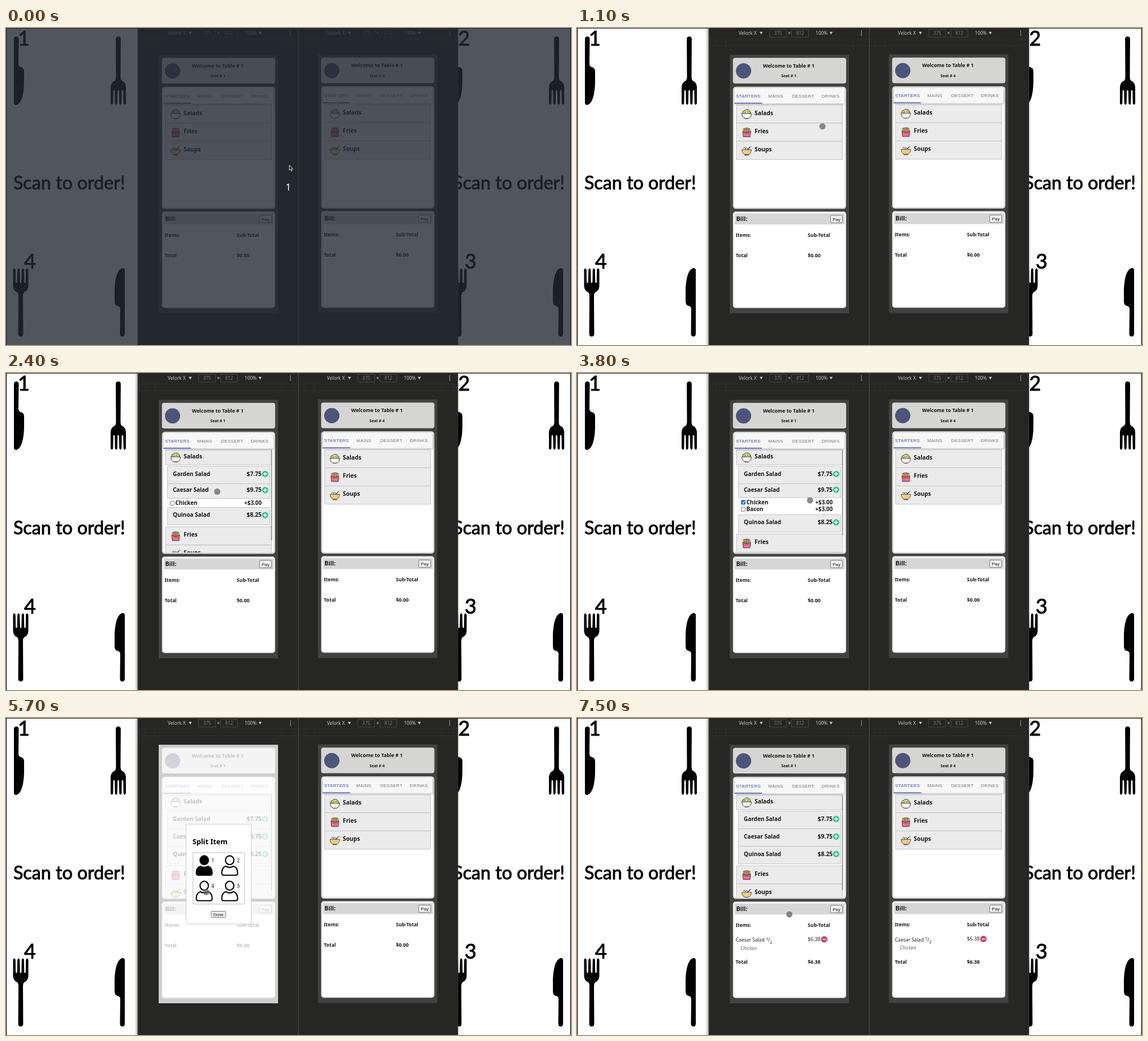
Write an HTML page with a canvas that moves like this. It is 999x560 px and loops after 8 s.

```html
<!DOCTYPE html>
<html lang="en">
<head>
<meta charset="utf-8">
<title>Table ordering demo</title>
<style>
html, body { margin: 0; width: 100%; height: 100%; overflow: hidden; background: #262624; }
canvas { display: block; width: 999px; height: 560px; }
</style>
</head>
<body>
<canvas id="stage" width="999" height="560"></canvas>
<script>
const g = document.getElementById('stage').getContext('2d');
const LOOP = 8000, STEP = 100;
const UI = '"Noto Sans", "Open Sans", sans-serif';
const ARIAL = '"Liberation Sans", Arial, sans-serif';
const ROUND = 'Lato, sans-serif';

// time, x, y of the pointer
const PATH = [
  [0, 501, 242], [300, 501, 242], [400, 496, 244], [700, 488, 236], [800, 488, 236],
  [900, 478, 219], [1000, 455, 195], [1200, 413, 152.5], [1500, 413, 152.5],
  [1800, 393, 174], [1900, 393, 174], [2200, 373.5, 209.5], [2400, 373.5, 209.5],
  [2500, 365, 215], [2600, 365, 215], [3300, 294, 229], [3400, 294, 229],
  [3500, 310, 228.5], [3600, 310, 228.5], [3800, 412, 225], [3900, 412, 225],
  [4400, 458, 206], [4600, 458, 206], [5400, 378, 269], [5700, 354, 307.5],
  [5900, 354, 307.5], [6000, 353, 308.5], [6300, 353, 308.5], [6900, 375.5, 347], [8000, 375.5, 347]
];

const clamp = v => Math.max(0, Math.min(1, v));
const ramp = (t, start, dur) => clamp((t - start) / dur);
const easeOut = p => 1 - (1 - p) * (1 - p);
const mix = (a, b, p) => a + (b - a) * p;

function pointerAt(t) {
  const i = PATH.findIndex(k => k[0] > t);
  const [t0, x0, y0] = PATH[i - 1], [t1, x1, y1] = PATH[i];
  const p = (t - t0) / (t1 - t0);
  return [mix(x0, x1, p), mix(y0, y1, p)];
}

function text(s, x, y, size, { weight = 700, color = '#161616', align = 'left', font = UI, style = '', gap = 0, bold = 0 } = {}) {
  g.font = `${style} ${weight} ${size}px ${font}`;
  g.letterSpacing = gap + 'px';
  g.textAlign = align;
  g.fillStyle = color;
  g.fillText(s, x, y);
  if (bold) {
    g.lineJoin = 'round';
    g.lineWidth = bold;
    g.strokeStyle = color;
    g.strokeText(s, x, y);
  }
}

function box(x, y, w, h, fill, stroke, r = 0, line = 1) {
  g.beginPath();
  g.roundRect(x, y, w, h, r);
  if (fill) { g.fillStyle = fill; g.fill(); }
  if (stroke) { g.strokeStyle = stroke; g.lineWidth = line; g.stroke(); }
}

function disc(x, y, r, fill) {
  g.beginPath();
  g.arc(x, y, r, 0, Math.PI * 2);
  g.fillStyle = fill;
  g.fill();
}

function shape(d, fill, stroke, line = 0.9) {
  const p = new Path2D(d);
  if (fill) { g.fillStyle = fill; g.fill(p); }
  if (stroke) { g.strokeStyle = stroke; g.lineWidth = line; g.stroke(p); }
}

function at(x, y, draw, turn = 0) {
  g.save();
  g.translate(x, y);
  g.rotate(turn);
  draw();
  g.restore();
}

// ---- posters ----
const knife = () =>
  shape('M5 0 C-4 2 -9 18 -9 44 L-9 59 Q-9 66 -3 67 Q1 68 1 73 L0.5 116 Q0.5 121 4.7 121 Q9 121 9 116 L9 4 Q9 0 5 0 Z', '#000');

function fork() {
  shape('M-13.5 3 Q-11.3 -2 -9.2 3 L-8.8 25 Q-7.5 28 -6.2 25 L-5.8 3 Q-3.8 -2 -1.8 3 L-1.3 25 Q0 28 1.3 25 L1.8 3 '
    + 'Q3.8 -2 5.8 3 L6.2 25 Q7.5 28 8.8 25 L9.2 3 Q11.3 -2 13.5 3 '
    + 'L13.5 32 Q13 40 6 43 Q4 45 4 50 L4.4 117 Q4 121 0 121 Q-4 121 -4.4 117 L-4 50 Q-4 45 -6 43 Q-13 40 -13.5 32 Z', '#000');
}

function poster(dx, upper, lower, ux, lx) {
  const ink = { weight: 400, color: '#000', font: ROUND, bold: 0.9 };
  at(23 + dx, 136, knife, Math.PI);
  at(198.5 + dx, 136, fork, Math.PI);
  at(26 + dx, 424, fork);
  at(201 + dx, 424, knife);
  text(upper, ux, 31, 36, ink);
  text(lower, lx, 425, 36, ink);
  text('Scan to order!', 13 + dx * 1.003, 285, 32.2, ink);
}

function posters() {
  g.fillStyle = '#fff';
  g.fillRect(0, 0, 999, 560);
  poster(0, '1', '4', 21, 32);
  poster(775, '2', '3', 799.5, 811);
  g.fillStyle = '#222';
  g.fillRect(0, 0, 999, 1);
  g.fillRect(0, 0, 1.3, 560);
  g.fillRect(997.6, 0, 1.4, 560);
}

// ---- browser windows ----
function frame(x, w) {
  g.fillStyle = '#262624';
  g.fillRect(x, 0, w, 560);
  g.fillStyle = '#2e2e2c';
  g.fillRect(x, 19, w, 1);
  g.fillRect(x, 31, w, 1);
  for (const tick of [3, 12, 30, 254, 276]) g.fillRect(x + tick, 20, 1, 11);

  const bar = { weight: 400, color: '#c4c4c2' }, dim = { weight: 400, color: '#777', align: 'center' };
  text('Velork X', x + 53, 12.3, 8.3, bar);
  for (const [n, left] of [['375', 107.5], ['812', 146.5]]) {
    box(x + left, 2.5, 30, 13.5, null, '#464644');
    text(n, x + left + 15, 12.3, 8.3, dim);
  }
  text('×', x + 142.5, 12.3, 9, { ...bar, align: 'center' });
  text('100%', x + 189, 12.3, 8.3, bar);
  for (const tri of [90, 213.5])
    shape(`M${x + tri} 6.7 h5.6 l-2.8 4.8 Z`, '#c4c4c2');
  for (const y of [5.5, 9, 12.5]) disc(x + 270, y, 0.9, '#c4c4c2');
}

// ---- menu icons, centred on 0,0 ----
const INK = '#2b2b2b';

function salad() {
  disc(-4, -3, 3, '#a5d873');
  disc(0, -5, 3.2, '#f6d27c');
  disc(4.5, -3, 2.8, '#a5d873');
  shape('M-7 -1 Q-8 -6 -4 -6 Q-2 -9 1 -8 Q6 -8 7 -1', null, INK);
  shape('M-4 -2 L-1 -5 M1 -3 L3 -6', null, INK, 0.7);
  shape('M-8.5 -1 H8.5 Q8 6 3 7.5 H-3 Q-8 6 -8.5 -1 Z', '#fbf8ee', INK);
  shape('M-3 8 H3', null, '#d8455c', 1.4);
}

function fries() {
  for (let x = -5.8; x < 5; x += 2.9)
    box(x, -8 + Math.abs(x + 1.4) * 0.3, 2.9, 10, '#d9a95e', INK, 0, 0.6);
  shape('M-7 -2 Q0 3 7 -2 L6 8 H-6 Z', '#f0587c', INK, 0.8);
  shape('M-5.5 5 H5.5', null, '#f79ab0', 1);
}

function soup() {
  shape('M1 -1 L7 -7', null, INK, 1.2);
  disc(7, -7, 1.5, '#8fc9dd');
  shape('M-6 -3 Q-4 -8 -2 -3 M-3 -2 Q0 -7 2 -3', '#b9e0ea', INK, 0.7);
  shape('M-8.5 -1.5 H8.5 Q8 5 3 7 H-3 Q-8 5 -8.5 -1.5 Z', '#f8cc74', INK, 0.8);
  shape('M-4 8 H4', null, INK, 0.9);
}

// ---- app ----
const ROW = '#ebebeb', EDGE = '#c3c3c3';

function category(name, icon, y, h) {
  box(281.8, y, 187.6, h, ROW, EDGE);
  at(300, y + h / 2 + 0.2, icon);
  text(name, 314, y + h / 2 + 1.5, 10.3);
}

function dish(name, price, y, h) {
  const mid = y + h / 2 - 2;
  box(285.3, y, 180.9, h, ROW, EDGE);
  text(name, 295, mid + 3.6, 10);
  text(price, 452, mid + 3.6, 10.3, { align: 'right' });
  disc(458.2, mid + 0.2, 5.6, '#2fc698');
  shape(`M455 ${mid + 0.2} h6.4 M458.2 ${mid - 3} v6.4`, null, '#fff', 1.6);
}

function extra(name, y, on) {
  box(290.5, y - 3.3, 7, 7, on ? '#1769d2' : '#fff', on ? '#1769d2' : '#777', 1);
  if (on) shape(`M292 ${y + 0.2} l1.6 1.8 l2.9 -3.8`, null, '#fff', 1.2);
  text(name, 299.5, y + 3.4, 9.8);
  text('+$3.00', 452, y + 3.4, 9.8, { align: 'right' });
}

function menu({ open, mods, checked }) {
  g.save();
  g.beginPath();
  g.rect(279, 135, 193, 182);
  g.clip();
  const head = mix(32, 26, open), top = 136 + head;
  const rowH = mix(31, 24.5, easeOut(mods)), panel = 30 * mods;
  const area = open * 99 + (rowH - 31) + panel;
  category('Salads', salad, 136, head);
  if (open > 0) {
    g.save();
    g.beginPath();
    g.rect(279, top, 193, area);
    g.clip();
    const y = 195.7 + rowH;
    dish('Garden Salad', '$7.75', 164.7, 31);
    dish('Caesar Salad', '$9.75', 195.7, rowH);
    if (mods > 0) {
      g.save();
      g.beginPath();
      g.rect(284, y, 183, panel);
      g.clip();
      extra('Chicken', y + 8, checked);
      extra('Bacon', y + 20.4, false);
      g.restore();
    }
    dish('Quinoa Salad', '$8.25', y + panel, 31);
    g.restore();
  }
  category('Fries', fries, top + area, 32.2);
  category('Soups', soup, top + area + 32.2, 32.2);
  if (open > 0) {
    const content = head + area + 72;
    g.fillStyle = '#999';
    g.fillRect(468.6, 136, 2, 182 * 182 / content);
  }
  g.restore();
}

function bill(ordered) {
  box(276.6, 325.1, 198.4, 168.8, '#fff', '#e4e4e4', 4, 1.8);
  g.fillStyle = '#d6d6d6';
  g.fillRect(279, 327.5, 194, 19.5);
  text('Bill:', 281.5, 340.8, 10.6);
  box(448.3, 331, 21, 13, '#f2f2f2', '#777', 1);
  text('Pay', 458.8, 340.6, 8, { weight: 400, font: ARIAL, align: 'center' });
  text('Items:', 280.5, 368.5, 8.6);
  text('Sub-Total', 408, 368.5, 8.6);
  if (ordered) {
    const plain = { weight: 400, color: '#222' };
    text('Caesar Salad', 280.5, 395.3, 8.5, plain);
    text('1', 334, 392.5, 7.6, plain);
    text('/', 338, 395.3, 8.8, plain);
    text('2', 341, 398.5, 7.6, plain);
    text('Chicken', 289, 410, 8.5, { ...plain, color: '#666', style: 'italic' });
    text('$6.38', 408, 393.6, 8.8, plain);
    disc(437, 391, 5.6, '#d9365e');
    shape('M434 391 h6', null, '#fff', 1.8);
  }
  const y = ordered ? 434.3 : 405;
  text('Total', 280.5, y, 8.6);
  text(ordered ? '$6.38' : '$0.00', 408, y, 8.8);
}

function phone(seat, state) {
  g.fillStyle = '#424242';
  g.fillRect(270, 47.3, 211, 456.7);
  box(275.7, 52.8, 200.2, 45.2, '#d5d5d4', null, 4);
  disc(294.5, 75.8, 13.5, '#4c557c');
  text('Welcome to Table # 1', 374.3, 70, 8.7, { align: 'center' });
  text('Seat # ' + seat, 374.5, 87.4, 6.8, { align: 'center' });

  box(276.9, 104.9, 197.8, 213.4, '#fff', '#dadad9', 4, 2.4);
  menu(state);
  g.save();
  g.shadowColor = 'rgba(0,0,0,.4)';
  g.shadowBlur = 3;
  g.shadowOffsetY = 1;
  g.fillStyle = '#f7f7f7';
  g.fillRect(278.5, 106.5, 194.5, 27);
  g.restore();
  ['STARTERS', 'MAINS', 'DESSERT', 'DRINKS'].forEach((name, i) =>
    text(name, [281, 338, 380.3, 432.8][i], 122.8, 8,
      { weight: 400, font: ARIAL, gap: 0.23, color: i ? '#757575' : '#3f51b5' }));
  g.fillStyle = '#3f51b5';
  g.fillRect(278.5, 132, 48.5, 1.4);
  bill(state.ordered);
}

function person(x, y, label, filled) {
  const fill = filled ? '#000' : '#fff';
  at(x, y, () => {
    shape('M-14 13.5 C-14 6 -11 2.5 -6.5 1.3 C-3 4 3 4 6.5 1.3 C11 2.5 14 6 14 13.5 Q14 17.3 10.5 17.3 H-10.5 Q-14 17.3 -14 13.5 Z',
      fill, '#000', 2.1);
    g.beginPath();
    g.ellipse(0, -9.3, 7.4, 7.8, 0, 0, Math.PI * 2);
    g.fillStyle = fill;
    g.fill();
    g.stroke();
  });
  text(label, x + 12.7, y - 5.8, 8.6, { weight: 400, color: '#000' });
}

function dialog(alpha, shared) {
  if (alpha <= 0) return;
  g.save();
  g.globalAlpha = alpha;
  g.fillStyle = 'rgba(255,255,255,.74)';
  g.fillRect(270, 47.3, 211, 456.7);
  box(318.5, 187.5, 115, 176.5, '#fff', '#ccc', 2);
  text('Split Item', 329.7, 223, 12.7, { color: '#000' });
  box(330.5, 237.7, 91.3, 91, '#fff', '#c8c8c8', 3, 1.2);
  person(350.5, 260.5, '1', true);
  person(395.5, 260.5, '2', false);
  person(350.5, 305.5, '4', shared);
  person(395.5, 305.5, '3', false);
  box(362.8, 341.5, 25.5, 11, '#efefef', '#777', 1);
  text('Done', 375.5, 349.8, 7.6, { weight: 400, font: ARIAL, align: 'center' });
  g.restore();
}

function pointer(t) {
  const [x, y] = pointerAt(t);
  if (t >= 1000) disc(x, y, 5.5, 'rgba(101,101,101,.75)');
  else at(x, y, () => shape('M0 0 V9.2 L2.1 7.4 L3.6 10.6 L5 10 L3.6 7 H6.3 Z', '#222', '#e8e8e8', 0.9));
}

function draw(t) {
  const focused = t >= 1000;
  const mods = t >= 4600 ? 1 - ramp(t, 4500, 300) : ramp(t, 2345, 105);
  const ordered = t >= 7500;

  posters();
  if (focused) {
    const shade = g.createLinearGradient(227, 0, 233, 0);
    shade.addColorStop(0, 'rgba(0,0,0,0)');
    shade.addColorStop(1, 'rgba(0,0,0,.3)');
    g.fillStyle = shade;
    g.fillRect(227, 0, 6, 560);
  }
  frame(514.5, 284.5);
  frame(233, 284);
  g.fillStyle = '#4a4a48';
  g.fillRect(232.5, 0, 1.2, 560);
  g.fillStyle = focused ? '#3a3a38' : '#4a4a48';
  g.fillRect(515.8, 0, 2.2, 560);
  g.fillStyle = '#3a3a38';
  g.fillRect(798.5, 0, 1, 560);

  phone(1, { open: easeOut(ramp(t, 1350, 210)), mods, checked: t >= 3500, ordered });
  at(281.5, -0.6, () => phone(4, { open: 0, mods: 0, checked: false, ordered }));
  dialog(t < 7400 ? ramp(t, 4500, 400) : t < 7500 ? 0.4 : 0, t >= 6400);

  if (t < 400) {
    g.fillStyle = 'rgba(35,40,50,.79)';
    g.fillRect(0, 0, 999, 560);
    text('1', 499, 286.5, 17, { weight: 400, color: '#fff', align: 'center' });
  }
  pointer(t);
}

const start = performance.now();
function tick() {
  const t = (performance.now() - start) % LOOP;
  draw(Math.floor(t / STEP) * STEP);
  requestAnimationFrame(tick);
}
tick();
</script>
</body>
</html>
```
